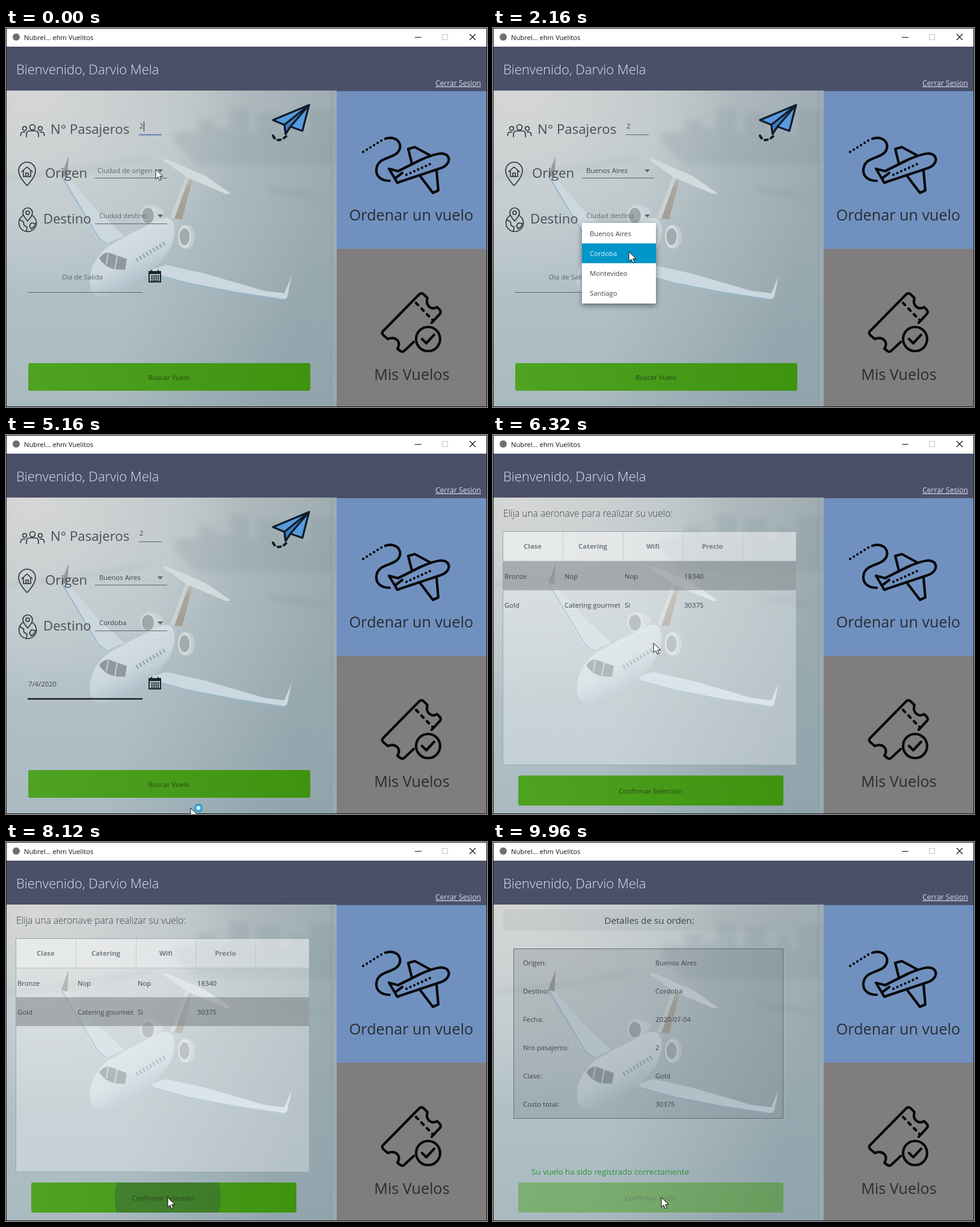
Write an HTML page that moves like this. It is 800 px wide and 630 px high and loops after 10 s.

```html
<!DOCTYPE html>
<html lang="es">
<head>
<meta charset="utf-8">
<title>Aerotaxi</title>
<style>
html, body { margin: 0; width: 100%; height: 100%; overflow: hidden; }
svg { display: block; width: 800px; height: 630px; }
text { font: 11.3px "Open Sans", "Noto Sans", sans-serif; fill: #3d444a; }
.mid { text-anchor: middle; }
.bold { font-weight: 700; }
.label { font-size: 22.2px; fill: #484f56; }
.prompt { fill: #5d676e; }
.tile { font-size: 25.2px; fill: #2a2c31; text-anchor: middle; }
.head { font-weight: 700; fill: #777e82; text-anchor: middle; }
.date { font-size: 31.2px; font-weight: 700; fill: #fff; }
.action { fill: #28451b; text-anchor: middle; }
.icon { fill: none; stroke: #2b3238; stroke-width: 1.6; stroke-linecap: round; stroke-linejoin: round; }
.big { stroke: #08090b; stroke-width: 4.2; }
.line { stroke: #59646b; }
.shadow { filter: drop-shadow(0 3px 5px #0007); }

/* One percent is 100 ms. */
.step, .move, .fade, .ripple { animation: 10s infinite; }
.step { animation-timing-function: step-end; }
.fade { animation-timing-function: linear; }
.ripple { animation-timing-function: ease-out; fill: #3a5a45; }
.move { animation-timing-function: ease-in-out; }

.form { animation-name: form; }
.table { animation-name: table; }
.order { animation-name: order; }
.typing { animation-name: typing; }
.from-empty { animation-name: from-empty; }
.from-set { animation-name: from-set; }
.to-empty { animation-name: to-empty; }
.to-set { animation-name: to-set; }
.day-empty { animation-name: day-empty; }
.day-set { animation-name: day-set; }
.june-day { animation-name: june-day; }
.july-day { animation-name: july-day; }
.busy { animation-name: busy; }
.row-pick { animation-name: row-pick; }
.from-list { animation-name: from-list; }
.to-list { animation-name: to-list; }
.to-hover { animation-name: to-hover; }
.calendar { animation-name: calendar; }
.months { animation-name: months; }
.search-wave { animation-name: search-wave; }
.select-wave { animation-name: select-wave; }
.confirm-wave { animation-name: confirm-wave; }
.done { animation-name: done; }
.disable { animation-name: disable; }
.pointer { animation-name: pointer; }

@keyframes form { 0% { visibility: visible } 57.2%, 100% { visibility: hidden } }
@keyframes table { 0% { visibility: hidden } 57.2% { visibility: visible } 83.2%, 100% { visibility: hidden } }
@keyframes order { 0% { visibility: hidden } 83.2%, 100% { visibility: visible } }
@keyframes typing { 0% { opacity: 1 } .8%, 100% { opacity: 0 } }
@keyframes from-empty { 0% { opacity: 1 } 8%, 100% { opacity: 0 } }
@keyframes from-set { 0% { opacity: 0 } 8%, 100% { opacity: 1 } }
@keyframes to-empty { 0% { opacity: 1 } 24%, 100% { opacity: 0 } }
@keyframes to-set { 0% { opacity: 0 } 24%, 100% { opacity: 1 } }
@keyframes day-empty { 0% { opacity: 1 } 46.4%, 100% { opacity: 0 } }
@keyframes day-set { 0% { opacity: 0 } 46.4%, 100% { opacity: 1 } }
@keyframes june-day { 0% { opacity: 1 } 46%, 100% { opacity: 0 } }
@keyframes july-day { 0% { opacity: 0 } 46%, 100% { opacity: 1 } }
@keyframes busy { 0% { opacity: 0 } 50.8% { opacity: 1 } 52.4%, 100% { opacity: 0 } }
@keyframes row-pick { 0% { opacity: 0 } 60% { opacity: 1; transform: none } 66.4%, 100% { opacity: 1; transform: translateY(48px) } }
@keyframes from-list { 0%, .8% { opacity: 0 } 2.4%, 8% { opacity: 1 } 9.2%, 100% { opacity: 0 } }
@keyframes to-list { 0%, 16.8% { opacity: 0 } 18.4%, 24% { opacity: 1 } 25.2%, 100% { opacity: 0 } }
@keyframes to-hover { 0% { transform: translateY(-33px) } 20.4%, 100% { transform: none } }
@keyframes calendar { 0%, 32.8% { opacity: 0 } 34.8%, 47.2% { opacity: 1 } 48.8%, 100% { opacity: 0 } }
@keyframes months { 0%, 40.8% { transform: none } 43.2%, 100% { transform: translateX(-310px) } }
@keyframes search-wave { 0%, 54.4% { r: 0; opacity: .45 } 56.8% { r: 250px; opacity: .45 } 57.2%, 100% { r: 250px; opacity: 0 } }
@keyframes select-wave { 0%, 79.8% { r: 0; opacity: .45 } 81.2% { r: 87px; opacity: .45 } 83%, 100% { r: 230px; opacity: .1 } }
@keyframes confirm-wave { 0%, 92.4% { r: 0; opacity: .45 } 95% { r: 240px; opacity: .3 } 97%, 100% { r: 240px; opacity: 0 } }
@keyframes done { 0%, 94% { opacity: 0 } 95.2%, 100% { opacity: 1 } }
@keyframes disable { 0%, 94% { opacity: 1 } 95.2%, 100% { opacity: .5 } }
@keyframes pointer {
  0%, 2% { transform: translate(249px, 235px) }
  6%, 9.2% { transform: translate(212px, 266px) }
  15.2%, 17.6% { transform: translate(246px, 312px) }
  21.2%, 24% { transform: translate(226px, 372px) }
  30.4%, 33.2% { transform: translate(246px, 412px) }
  39.6%, 42.4% { transform: translate(319px, 564px) }
  44.8%, 47% { transform: translate(314px, 622px) }
  51.2%, 51.8% { transform: translate(307px, 620px) }
  53.8%, 55.6% { transform: translate(276px, 583px) }
  59.4%, 60.4% { transform: translate(235px, 236px) }
  63.2% { transform: translate(267px, 346px) }
  65.6%, 69% { transform: translate(250px, 284px) }
  78.8%, 83.6% { transform: translate(269px, 591px) }
  90.8%, 100% { transform: translate(280px, 591px) }
}
</style>
</head>
<body>
<svg viewBox="0 0 800 630">
  <defs>
    <linearGradient id="sea" x2="0" y2="1">
      <stop stop-color="#b9c2c5"/><stop offset=".4" stop-color="#b7c4c9"/><stop offset="1" stop-color="#a9bac1"/>
    </linearGradient>
    <linearGradient id="dusk" x2="1" y2=".25">
      <stop offset=".5" stop-color="#758990" stop-opacity="0"/><stop offset="1" stop-color="#71878f" stop-opacity=".42"/>
    </linearGradient>
    <radialGradient id="sun" cx=".08" cy="0" r=".65">
      <stop stop-color="#e6e2de" stop-opacity=".65"/><stop offset="1" stop-color="#e5e7e6" stop-opacity="0"/>
    </radialGradient>
    <linearGradient id="green"><stop stop-color="#4fa323"/><stop offset="1" stop-color="#3e930f"/></linearGradient>
    <linearGradient id="hull" x1=".3" y1=".25" x2=".65" y2=".85"><stop stop-color="#d5dfe3"/><stop offset=".5" stop-color="#cbd7dd"/><stop offset="1" stop-color="#aabcc5"/></linearGradient>
    <linearGradient id="fin" x2="0" y2="1"><stop stop-color="#c6cbcb"/><stop offset=".35" stop-color="#aba79d"/><stop offset="1" stop-color="#a39d92"/></linearGradient>
    <filter id="soft"><feGaussianBlur stdDeviation="4"/></filter>
    <clipPath id="photo"><rect x="1" y="104" width="549" height="525"/></clipPath>
    <clipPath id="search"><rect x="37" y="557" width="469" height="46" rx="3"/></clipPath>
    <clipPath id="confirm"><rect x="42" y="566" width="441" height="50" rx="3"/></clipPath>
    <clipPath id="pages"><rect x="37" y="529" width="310" height="101"/></clipPath>
    <path id="drop" d="M252 0h9l-4.500 5z" fill="#59646b"/>
  </defs>

  <!-- Window -->
  <rect width="800" height="630" fill="#17191c"/>
  <rect x="1" y="1" width="798" height="30" fill="#fff"/>
  <circle cx="17" cy="15" r="6" fill="#6d6f73"/>
  <text x="30" y="20" style="font-size:11.2px;fill:#111">Nubrel... ehm Vuelitos</text>
  <g fill="none" stroke="#111">
    <path d="M680 15.500h11"/>
    <rect x="725.500" y="10.500" width="9" height="9" stroke="#c5c5c5"/>
    <path d="M771 10l10 10m0-10l-10 10" stroke-width="1.200"/>
  </g>
  <rect x="1" y="31" width="798" height="74" fill="#4b5069"/>
  <text x="17" y="77" style="font-size:22px;font-weight:300;fill:#dfe4f0">Bienvenido, Darvio Mela</text>
  <text x="790" y="96" text-anchor="end" text-decoration="underline" style="font-size:12.100px;fill:#d6dbe9">Cerrar Sesion</text>

  <!-- Backdrop -->
  <g clip-path="url(#photo)">
    <rect y="104" width="550" height="526" fill="url(#sea)"/>
    <rect y="104" width="550" height="526" fill="url(#dusk)"/>
    <rect y="104" width="550" height="526" fill="url(#sun)"/>
    <g filter="url(#soft)" fill="#7d9097" opacity=".2">
      <path d="M280 190v-18h40v-20h28v14h24v-34h32v40h14v-32h38v36h16v-22h22v26h12v-44h56v92H320z"/>
      <path d="M435 266l60 4 40 12v6l-50-6-50-10z"/>
      <path d="M0 247Q110 238 240 212v5Q110 243 0 252z"/>
    </g>
    <path d="M104 213l-12 33 10 4z" fill="#959794"/>
    <path d="M92 246L104 249 150 302 197 346 178 353 165 360 150 348z" fill="#ccd8de"/>
    <path d="M93 247l61 102 14 10" fill="none" stroke="#96b6cb" stroke-width="2"/>
    <path d="M236 294q18 0 27 12l-12 17-15 4z" fill="#c9d3d7"/>
    <ellipse cx="237" cy="311" rx="14" ry="16" fill="#cfd8dc"/>
    <ellipse cx="236" cy="312" rx="10" ry="13" fill="#9da8ab"/>
    <path d="M302 238L313 241 293 318 272 316z" fill="url(#fin)"/>
    <path d="M302 238l-30 78 8 1 28-78z" fill="#c9d1d3"/>
    <path d="M261 217Q280 222 300 232L332 246 374 275 366 276 302 249 262 221z" fill="#d1dadd"/>
    <path d="M238 403L266 394 330 408 430 437 463 441 475 412 468 446Q466 452 456 450L380 439 300 424 260 414z" fill="#cbd8df"/>
    <path d="M250 410l52 14 78 15 80 12" fill="none" stroke="#97b8cc" stroke-width="2"/>
    <path d="M140 412C143 392 155 374 172 362L204 344 258 317Q276 311 280 330 283 350 269 374L241 406 197 436Q162 452 147 442 137 432 140 412z" fill="url(#hull)"/>
    <path d="M155 383Q160 374 170 373L201 384 198 402 180 401Q164 397 155 383z" fill="#8e999e"/>
    <path d="M170 374l-3 19m18-15l-4 23" stroke="#c4ced2" stroke-width="2"/>
    <path d="M217 386l50-30" stroke="#93a6af" stroke-width="7" stroke-dasharray="2.500 4"/>
    <ellipse cx="301" cy="347" rx="13" ry="20" fill="#c0ccd1"/>
    <ellipse cx="297" cy="347" rx="11" ry="19" fill="#d3dcdf"/>
    <ellipse cx="297" cy="347" rx="8.500" ry="14" fill="#a2aaab"/>
    <rect x="541" y="104" width="9" height="526" fill="#9dadb3" opacity=".5"/>
    <path d="M541.500 104v526" stroke="#70838a" opacity=".5"/>
  </g>

  <!-- Side tiles -->
  <rect x="550" y="105" width="249" height="262" fill="#7091c0"/>
  <rect x="550" y="367" width="249" height="262" fill="#807d7e"/>
  <g class="icon big">
    <path d="M594 206l32-20" stroke-dasharray=".1 7"/>
    <path d="M631 184c22-7 32 14 18 25-12 9-31 7-33 26-1 13 10 19 22 19"/>
    <path d="M654 256l69-23c20-7 17-27-3-24-12 2-21 6-30 10l-38 19-15-4 12 20q1 5 5 2z"/>
    <path d="M675 225l-6-24 11-3 26 14M688 245l22 29 9-4-3-34M647 250l12-9"/>
    <path d="M666 244l42-19" stroke-dasharray=".1 7"/>
    <g transform="translate(2 1)">
      <path d="M706 489l13-14q4-4 0-8l-4-4q-7 4-12 0-7-5-4-15l-6-6q-4-4-8 0l-60 61q-3 3 1 7l7 6q10-4 16 2 5 6 0 14l5 4q3 2 6 0l16-15"/>
      <path d="M680 456l28 29" stroke-dasharray="5 8"/>
    </g>
    <circle cx="702" cy="517" r="20"/><path d="M692 517l7 7 13-14"/>
  </g>
  <text class="tile" x="674" y="320">Ordenar un vuelo</text>
  <text class="tile" x="675" y="585">Mis Vuelos</text>

  <!-- Flight form -->
  <g class="step form">
    <g stroke="#111c2b" stroke-width="3.200" stroke-linejoin="round" stroke-linecap="round">
      <path d="M504 128l-60 25 19 8 2 15 8-12 20 7z" fill="#579bdd"/>
      <path d="M504 128l-41 33 2 15 8-12z" fill="#3c7fc3"/>
      <path d="M444 179q7 14 22 1" fill="none" stroke-width="4" stroke-dasharray="5 6"/>
    </g>
    <g class="icon">
      <circle cx="44" cy="165" r="4.500"/><path d="M34 181v-4q0-6 6-6h8q6 0 6 6v4"/>
      <circle cx="31" cy="167" r="3.300"/><path d="M24.500 179v-2q0-4 5-4h2"/>
      <circle cx="57" cy="167" r="3.300"/><path d="M63.500 179v-2q0-4-5-4h-2"/>
      <path d="M35 262q-14-15-14-25a14 14 0 0 1 28 0q0 10-14 25z"/>
      <path d="M26 239l9-8 9 8m-15-2v10h12v-10m-8 10v-6h4v6"/>
      <circle cx="36" cy="324" r="14.500"/>
      <path d="M36 321q-8-9-8-14a8 8 0 0 1 16 0q0 5-8 14z" fill="#c1cacc"/>
      <circle cx="36" cy="307" r="3"/><path d="M23 319l6 3 1 6 5 3-1 7m8-14l7 1-3 6-4 3-3-5z"/>
    </g>
    <text class="label" x="74" y="176">N° Pasajeros</text>
    <text class="label" x="65" y="249">Origen</text>
    <text class="label" x="62" y="325">Destino</text>
    <path class="line" d="M221 177.500h38M148 249.500h120M148 325.500h120M36 439.500h191"/>
    <text x="222" y="167">2</text>
    <g class="step typing" fill="none"><path d="M229.500 155v17" stroke="#222"/><path d="M221 177.500h38" stroke="#4668b5" stroke-width="1.500"/></g>
    <use href="#drop" y="235"/><use href="#drop" y="310"/>
    <text class="prompt step from-empty" x="152" y="241" style="font-size:11.500px">Ciudad de origen</text>
    <text class="step from-set" x="155" y="241">Buenos Aires</text>
    <text class="prompt step to-empty" x="155" y="316">Ciudad destino</text>
    <text class="step to-set" x="155" y="316">Cordoba</text>
    <text class="prompt step day-empty" x="93" y="418">Dia de Salida</text>
    <g class="step day-set"><text x="37" y="418">7/4/2020</text><path d="M36 438.500h191" stroke="#111" stroke-width="2"/></g>
    <path d="M238 405h19v17h-19zM238 407h19M242 402v4m11-4v4" fill="none" stroke="#1c262e" stroke-width="2"/>
    <path d="M238 407h19" stroke="#1c262e" stroke-width="4"/>
    <path d="M241.500 412.500h13m-13 3.500h13m-13 3.500h13" stroke="#1c262e" stroke-width="2.400" stroke-dasharray="2.400 1.100"/>
    <g clip-path="url(#search)">
      <rect x="37" y="557" width="469" height="46" fill="url(#green)"/>
      <circle class="ripple search-wave" cx="276" cy="583" r="0"/>
    </g>
    <text class="action" x="271" y="585">Buscar Vuelo</text>

    <g class="fade from-list">
      <rect class="shadow" x="148" y="249" width="123" height="134" fill="#fff"/>
      <rect x="148" y="249" width="123" height="33" fill="#0096c9"/>
      <text x="161" y="270" style="fill:#fff">Buenos Aires</text><text x="161" y="303">Cordoba</text>
      <text x="161" y="336">Montevideo</text><text x="161" y="369">Santiago</text>
    </g>
    <g class="fade to-list">
      <rect class="shadow" x="148" y="324" width="123" height="134" fill="#fff"/>
      <rect class="step to-hover" x="148" y="358" width="123" height="33" fill="#0096c9"/>
      <text x="161" y="346">Buenos Aires</text><text x="161" y="379" style="fill:#e4f4fa">Cordoba</text>
      <text x="161" y="412">Montevideo</text><text x="161" y="445">Santiago</text>
    </g>

    <g class="fade calendar">
      <rect class="shadow" x="37" y="439" width="310" height="220" fill="#fff"/>
      <rect x="37" y="439" width="310" height="90"/>
      <text class="bold" x="61" y="466" style="font-size:13px;fill:#bdbdbd">2020</text>
      <text class="date step june-day" x="61" y="505">Tue, Jun 23</text>
      <text class="date step july-day" x="61" y="505">Sat, Jul 4</text>
      <g clip-path="url(#pages)"><g class="move months" id="months"></g></g>
      <path d="M71.500 549.500l-4.500 4.500 4.500 4.500M312.500 549.500l4.500 4.500-4.500 4.500" fill="none" stroke="#222" stroke-width="2.200"/>
    </g>
  </g>

  <!-- Aircraft table -->
  <g class="step table">
    <text x="17" y="136" style="font-size:15.500px;font-weight:300">Elija una aeronave para realizar su vuelo:</text>
    <rect x="17" y="160" width="488" height="388" fill="#fff" fill-opacity=".3"/>
    <rect x="17" y="160" width="488" height="49" fill="#fff" fill-opacity=".28"/>
    <path d="M116.500 160v49m100-49v49m100-49v49m99-49v49M17 209.500h488" stroke="#a9b2b5" stroke-opacity=".5"/>
    <rect class="step row-pick" x="17" y="210" width="488" height="48" fill="#747b7f" fill-opacity=".5"/>
    <rect x="16.500" y="160.500" width="488" height="388" fill="none" stroke="#98a7ad"/>
    <text class="head" x="66" y="189">Clase</text><text class="head" x="166" y="189">Catering</text>
    <text class="head" x="266" y="189">Wifi</text><text class="head" x="365" y="189">Precio</text>
    <text y="239"><tspan x="19">Bronze</tspan><tspan x="119">Nop</tspan><tspan x="219">Nop</tspan><tspan x="318">18340</tspan></text>
    <text y="287"><tspan x="19">Gold</tspan><tspan x="119">Catering gourmet</tspan><tspan x="219">Si</tspan><tspan x="318">30375</tspan></text>
    <g clip-path="url(#confirm)">
      <rect x="42" y="566" width="441" height="50" fill="url(#green)"/>
      <circle class="ripple select-wave" cx="269" cy="591" r="0"/>
    </g>
    <text class="action" x="262" y="596">Confirmar Seleccion</text>
  </g>

  <!-- Order details -->
  <g class="step order">
    <rect x="17" y="112" width="491" height="36" fill="#929c9f" opacity=".18"/>
    <text class="mid" x="260" y="136" style="font-size:15.200px">Detalles de su orden:</text>
    <rect x="34.500" y="177.500" width="448" height="282" fill="#68767d" fill-opacity=".25" stroke="#606d76"/>
    <g id="details"></g>
    <text class="fade done" x="64" y="553" style="font-size:13.300px;fill:#2b942c">Su vuelo ha sido registrado correctamente</text>
    <g class="fade disable">
      <g clip-path="url(#confirm)">
        <rect x="42" y="566" width="441" height="50" fill="url(#green)"/>
        <circle class="ripple confirm-wave" cx="280" cy="591" r="0"/>
      </g>
      <text class="action" x="262" y="596">Confirmar vuelo</text>
    </g>
  </g>

  <g class="move pointer">
    <path d="M0 0v16l4-3.500 2.500 6 2.700-1.200-2.600-5.700h5.400z" fill="#fff" stroke="#111"/>
    <circle class="step busy" cx="13" cy="0" r="5.500" fill="#cfeaf7" stroke="#35a0d8" stroke-width="4"/>
  </g>
</svg>
<script>
const label = (x, y, text, style = '', mid = false) =>
  `<text x="${x}" y="${y}"${mid ? ' class="mid"' : ''} style="${style}">${text}</text>`;

// Each month page shows its title, weekday letters and first week.
const month = (name, first, left) => {
  let page = label(left + 192, 559, `${name} 2020`, 'font-size:13px;font-weight:700;fill:#222', true);
  [...'SMTWTFS'].forEach((d, i) => {
    const x = left + 69 + i * 41;
    page += label(x, 596, d, 'font-weight:700;fill:#a0a0a0', true);
    if (i >= first) page += label(x, 629, i - first + 1, 'font-size:12px;font-weight:700;fill:#222', true);
  });
  return page;
};
document.getElementById('months').innerHTML = month('June', 1, 0) + month('July', 3, 310);

const details = [
  ['Origen:', 'Buenos Aires'], ['Destino:', 'Cordoba'], ['Fecha:', '2020-07-04'],
  ['Nro pasajeros:', '2'], ['Clase:', 'Gold'], ['Costo total:', '30375']
];
document.getElementById('details').innerHTML = details.map(([key, value], i) =>
  label(50, 205 + i * 46.9, key) + label(270, 205 + i * 46.9, value)).join('');
</script>
</body>
</html>
```
